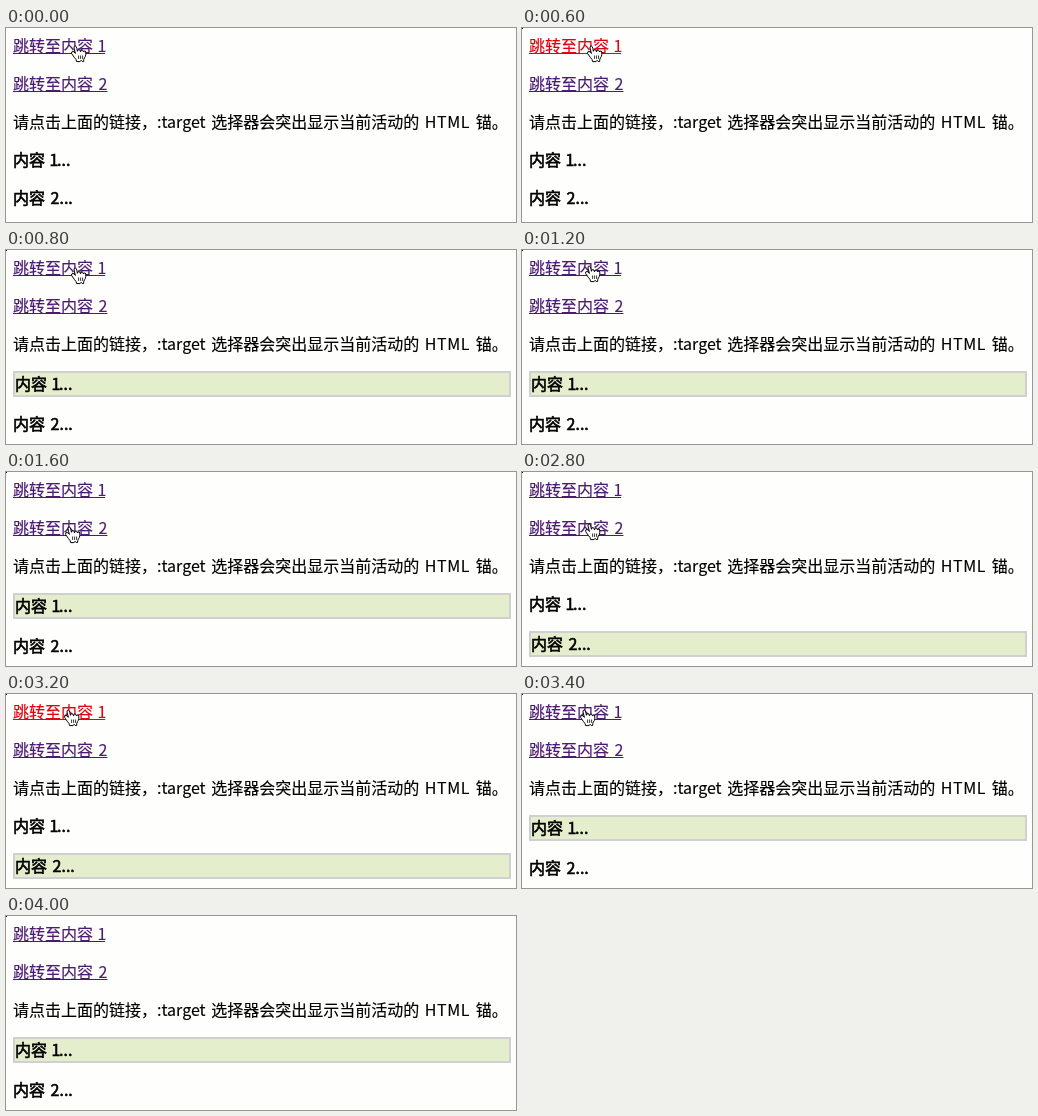
An HTML page for the animation above (4200 ms loop, 510 px wide and 194 px high).

```html
<!DOCTYPE html>
<html lang="zh-CN">
<head>
<meta charset="utf-8">
<title>:target</title>
<style>
  html, body { margin: 0; width: 510px; height: 194px; overflow: hidden; background: #fefefc; }
  body {
    position: relative; box-sizing: border-box; padding: 7px 5px 0 7px;
    font: 16px/20px "Noto Sans CJK SC", "Noto Sans CJK", sans-serif; color: #000;
    -webkit-text-stroke: .15px; word-spacing: 2px; white-space: nowrap; cursor: default;
    text-spacing-trim: space-all; text-autospace: no-autospace;
  }
  p { margin: 0 0 16px; padding-bottom: 2px; }
  a {
    color: #4b1a72; text-decoration: underline 1px;
    text-underline-offset: 1px; text-decoration-skip-ink: none;
  }
  a.active { color: #e00010; }
  b { font-weight: 400; -webkit-text-stroke: .6px; }
  .one { letter-spacing: -1.2px; }
  .html { letter-spacing: .6px; }
  .target { border: 2px solid #d0d0d0; background: #e4eecc; }
  #dot { position: absolute; left: 0; top: 0; width: 1px; height: 1px; background: #000; }
  svg { position: absolute; left: 0; top: 0; }
</style>
</head>
<body>
<p><a id="link">跳转至内容<span class="one"> 1</span></a></p>
<p><a>跳转至内容 2</a></p>
<p>请点击上面的链接，:target 选择器会突出显示当前活动的 <span class="html">HTML</span> 锚。</p>
<p id="news1"><b>内容<span class="one"> 1</span>...</b></p>
<p id="news2"><b>内容 2...</b></p>
<div id="dot"></div>
<svg width="510" height="194">
  <g id="hand" fill="#fff" stroke="#000" stroke-linejoin="round">
    <path d="M3.3 12.4L.6 8.5Q.3 6.4 1.9 6.4Q3 6.5 4.4 8.4L3 3Q2.8 1 4.2 .9Q5.4 1 5.8 3.4L6.4 6.3Q6.4 4.5 8 4.6Q9.2 4.7 9.5 6.9Q9.7 4.9 11 4.9Q12.3 5 12.5 7Q13 5.6 14.2 6Q15 6.4 14.8 9.5Q14.6 11.5 13.5 12.8Q12.6 14 12.6 16.5H11.2L10.2 15.3Q9.5 16.4 9 16.6H5.6Q5.6 14.5 3.3 12.4Z"/>
    <path d="M7.6 10.5v3.4m2-3.4v3.4m2-3.4v3.4" stroke-width=".8"/>
  </g>
  <path id="arrow" stroke="#fff" d="M.5 .5V14.5L3.8 11.4L6 16.8L8.4 15.8L6.2 10.6H10.8Z"/>
</svg>
<script>
  const LOOP = 4200;
  const el = id => document.getElementById(id);

  // [start time, x, y] of the pointer, which jumps between positions
  const pointer = [
    [0, 65, 17], [1200, 63, 15], [1400, 66, 49], [1600, 59, 54],
    [2800, 63, 51], [3000, 58, 15], [3600, 67, 15], [3800, 75, 152]
  ];
  // [start time, highlighted paragraph]
  const targets = [[0, 0], [800, 1], [2000, 2], [3400, 1]];

  const at = (steps, t) => steps.findLast(step => step[0] <= t);
  const between = (t, from, to) => t >= from && t < to;
  const show = (id, on) => { el(id).style.display = on ? "" : "none"; };

  function draw(now) {
    const t = now % LOOP;
    const [, x, y] = at(pointer, t);
    const [, target] = at(targets, t);

    el("link").classList.toggle("active", between(t, 600, 800) || between(t, 3200, 3400));
    for (const n of [1, 2]) el("news" + n).classList.toggle("target", n === target);

    el("hand").setAttribute("transform", `translate(${x} ${y})`);
    el("arrow").setAttribute("transform", `translate(${x} ${y})`);
    show("hand", t < 3800);
    show("arrow", between(t, 3800, 4000));
    show("dot", t >= 400);
  }

  const start = performance.now();
  function tick() {
    draw(performance.now() - start);
    requestAnimationFrame(tick);
  }
  tick();
</script>
</body>
</html>
```
